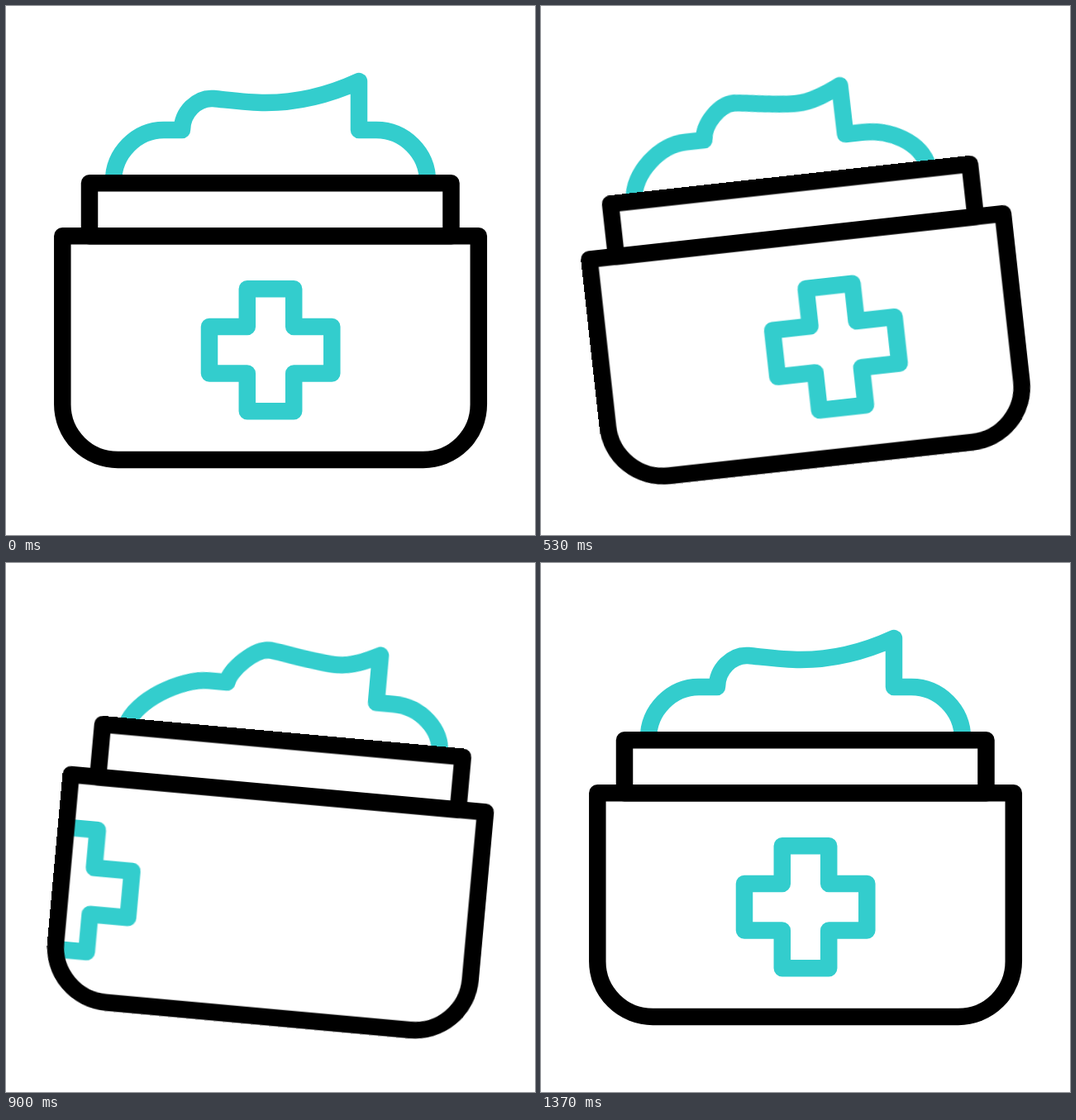
An HTML page without scripts that plays this animation: 640x640 px, repeating every 1670 ms.

```html
<!DOCTYPE html>
<html lang="en">
<head>
<meta charset="utf-8">
<title>Cream jar</title>
<style>
  html, body { margin: 0; width: 100%; height: 100%; overflow: hidden; background: #fff; }
  svg { display: block; width: 100%; height: 100%; }

  .line { fill: none; stroke: #000; stroke-width: 20.5; stroke-linejoin: round; }
  .teal { stroke: #33cdcd; }

  .jar, .cream, .leaving, .arriving {
    animation: 1670ms cubic-bezier(.333, 0, .667, 1) infinite;
  }
  .jar { transform-origin: 320px 381.5px; animation-name: rock; }
  .cream { animation-name: wobble; }
  .leaving { animation-name: leave; }
  .arriving { animation-name: arrive; }

  @keyframes rock {
    0%, 7.59%, 81.85%, 100% { transform: rotate(0deg); }
    22.75% { transform: rotate(-12deg); }
    47.7% { transform: rotate(7deg); }
    70.66% { transform: rotate(-3deg); }
  }

  /* The cream lags behind the jar: squeezed left, then right, then at rest */
  @keyframes wobble {
    0%, 5.99%, 68.86%, 100% {
      d: path("M130 212C130 178 158 150 191 150L213 150C213 129 231 110.5 251 112C271 114 293 117 314 117C350 117 390 108 427 91L427 150L448 150C482 150 510 178 510 212");
    }
    21.96% {
      d: path("M130 212C130 178 150 150 182 150L204 150C204 129 221 110.5 241 112C261 114 288 119 308 119C330 119 353 111 373.6 101.7L374 162L395 162C428 162 468 178 477 212");
    }
    46.9% {
      d: path("M130 212C140 184 200 150 235 150L257 150C260 136 291 104 309 105C339 109 376 117 398 117C409 117 418 110 428.6 104L428.7 161L449.7 161C483 161 510 186 510 212");
    }
  }

  /* One cross slides out on the right while its twin enters from the left */
  @keyframes leave {
    0%, 7.59% { transform: translateX(0); }
    23.15% { transform: translateX(-79px); }
    48.3%, 100% { transform: translateX(331px); }
  }
  @keyframes arrive {
    0%, 45.9% { transform: translateX(-345px); }
    45.91% { transform: translateX(-316px); }
    71.46%, 100% { transform: translateX(0); }
  }
</style>
</head>
<body>
<svg viewBox="0 0 640 640">
  <defs>
    <path id="body" d="M68.3 278.2H571.8V482A67 67 0 0 1 504.8 549H135.3A67 67 0 0 1 68.3 482Z"/>
    <path id="cross" d="M291.8 342.2h56.4v45.8h46.1v56.5h-46.1v45.8h-56.4v-45.8h-45.8v-56.5h45.8z"/>
    <clipPath id="inside"><use href="#body"/></clipPath>
  </defs>
  <g class="jar">
    <path class="line teal cream" d="M130 212C130 178 158 150 191 150L213 150C213 129 231 110.5 251 112C271 114 293 117 314 117C350 117 390 108 427 91L427 150L448 150C482 150 510 178 510 212"/>
    <g class="line teal" clip-path="url(#inside)">
      <use class="leaving" href="#cross"/>
      <use class="arriving" href="#cross"/>
    </g>
    <path class="line" d="M101 214.3H538.5V278.2H101Z"/>
    <use class="line" href="#body"/>
  </g>
</svg>
</body>
</html>
```
